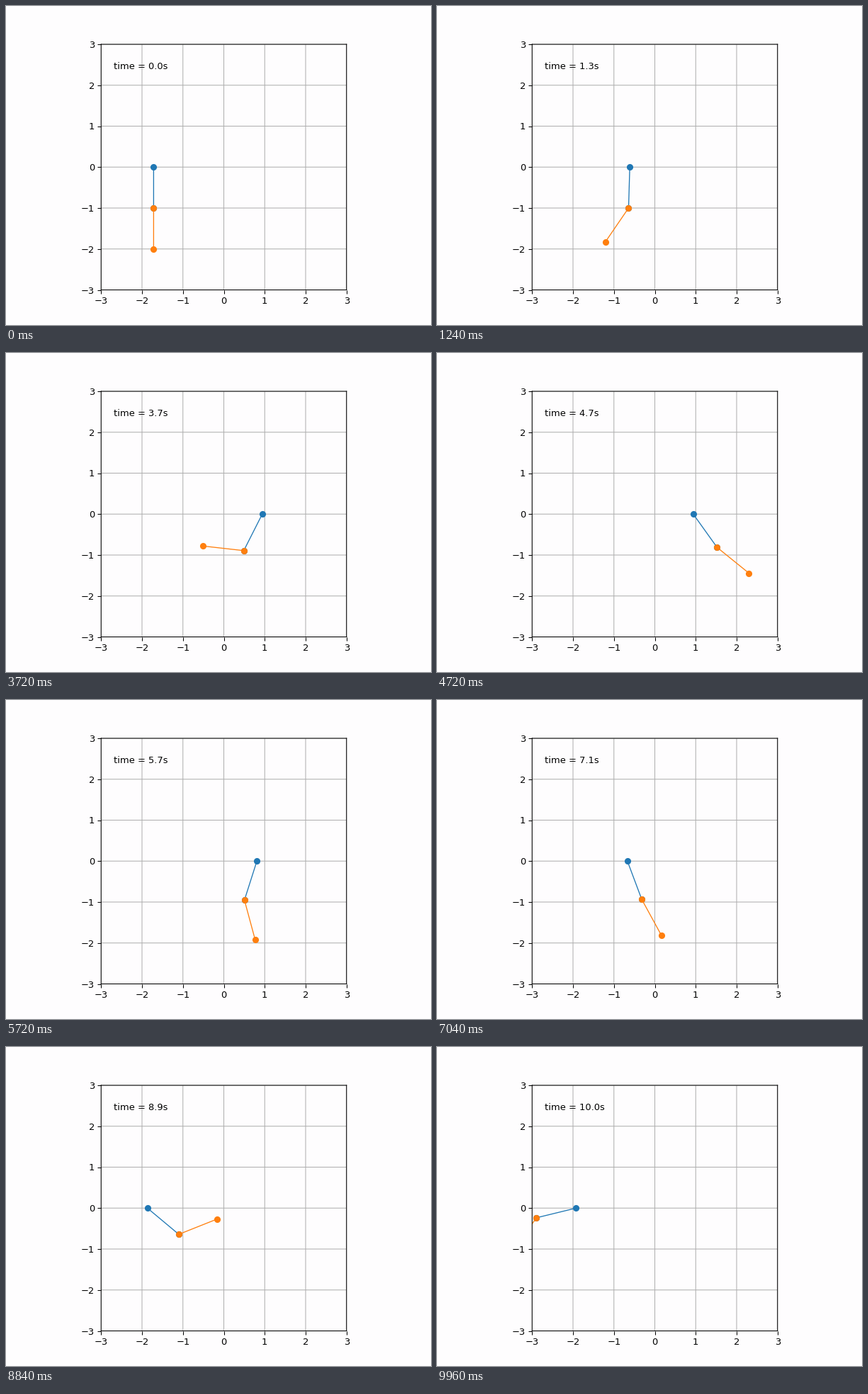
A matplotlib script that plays this animation: 600 by 450 pixels, repeating every 10000 ms.

```python
import numpy as np
import matplotlib.pyplot as plt
from matplotlib.animation import FuncAnimation

FRAMES = 250
INTERVAL = 40
PAPER = "#fefdfe"

# Turning points of each motion: (seconds, value); angles in degrees from down
CART = [(0, -1.716), (2.78, 0.94), (5.27, 0.94), (8.5, -1.86), (9.96, -1.924)]
UPPER = [(0, 0), (0.9, -22), (1.76, 38), (3.6, -28.5), (4.78, 36),
         (5.85, -19.7), (7.1, 20.8), (7.8, -58), (8.62, 63), (9.16, 27),
         (9.96, -76.3)]
LOWER = [(0, 0), (1.15, -36), (2.52, 113), (3.6, -99), (5.2, 90),
         (6.25, -62), (7.34, 48), (8.12, -86), (8.96, 122), (9.96, -35)]


def swing(points, t):
    """Ease with a half cosine from each turning point to the next."""
    times, values = np.array(points, float).T
    k = np.clip(np.searchsorted(times, t, side="right") - 1, 0, len(times) - 2)
    u = (t - times[k]) / (times[k + 1] - times[k])
    ease = (1 - np.cos(np.pi * u)) / 2
    return values[k] + (values[k + 1] - values[k]) * ease


t = np.arange(FRAMES) * INTERVAL / 1000
cart = swing(CART, t)
upper = np.radians(swing(UPPER, t))
lower = np.radians(swing(LOWER, t))
joint_x, joint_y = cart + np.sin(upper), -np.cos(upper)
tip_x, tip_y = joint_x + np.sin(lower), joint_y - np.cos(lower)

plt.rcParams["path.snap"] = False
fig, ax = plt.subplots(figsize=(6.4, 4.8), dpi=93.75, facecolor=PAPER)
ax.set(xlim=(-3, 3), ylim=(-3, 3), aspect="equal", facecolor=PAPER,
       xticks=range(-3, 4), yticks=range(-3, 4))
ax.grid()

upper_rod, = ax.plot([], [], "o-", lw=1, color="tab:blue")
lower_rod, = ax.plot([], [], "o-", lw=1, color="tab:orange")
clock = ax.text(0.05, 0.9, "", transform=ax.transAxes)


def update(i):
    upper_rod.set_data([cart[i], joint_x[i]], [0, joint_y[i]])
    lower_rod.set_data([joint_x[i], tip_x[i]], [joint_y[i], tip_y[i]])
    # The clock runs half a frame ahead
    clock.set_text(f"time = {t[i] + 0.02:.1f}s")
    return upper_rod, lower_rod, clock


anim = FuncAnimation(fig, update, frames=FRAMES, interval=INTERVAL,
                     repeat=True, repeat_delay=0)
plt.show()
```
